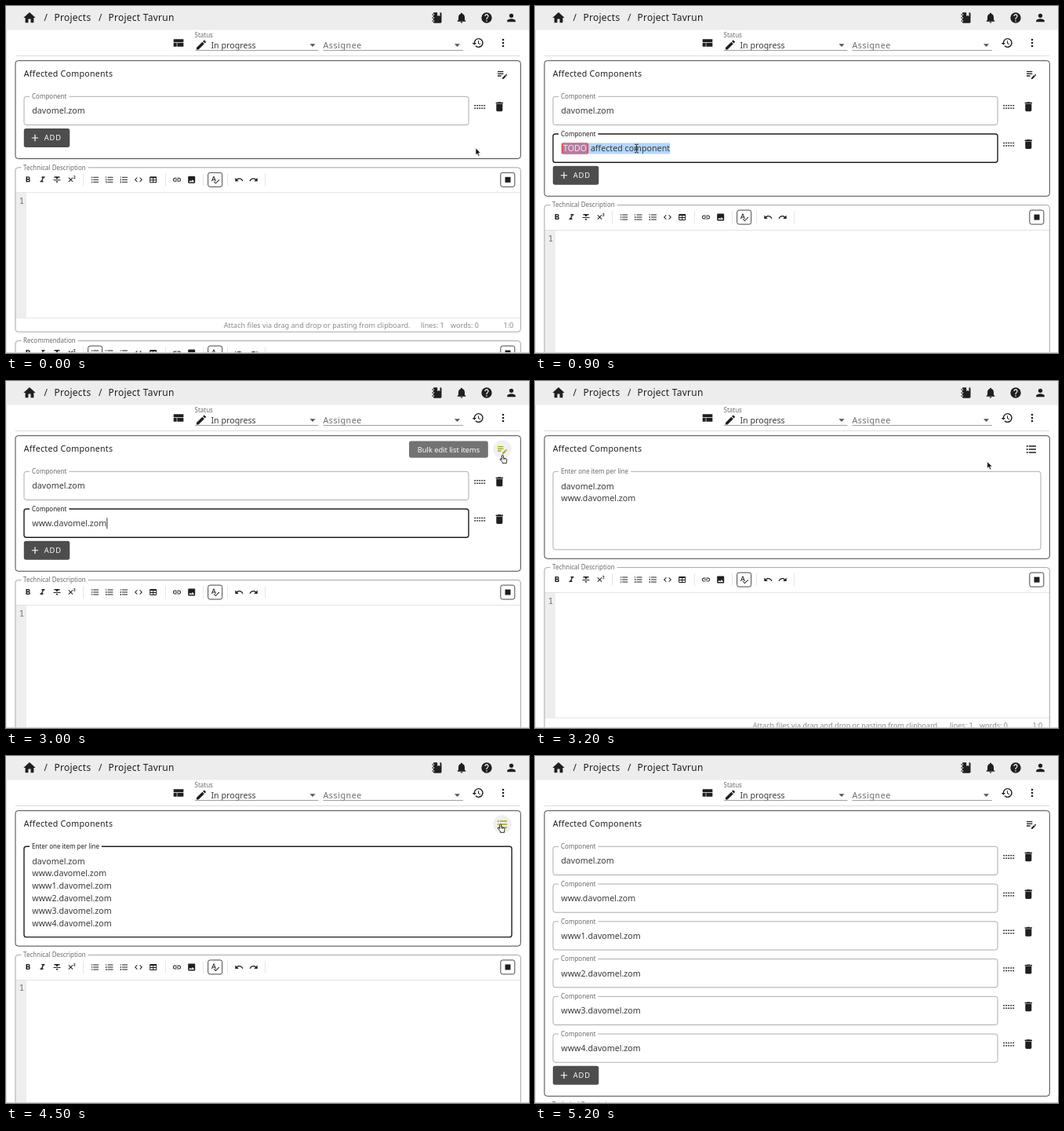
Recreate the animation shown at these times as an HTML page. Size 667 by 442 pixels, loop 5.4 s.

```html
<!DOCTYPE html>
<html lang="en">
<head>
<meta charset="utf-8">
<title>Bulk editing components</title>
<style>
html, body { margin: 0; width: 100%; height: 100%; overflow: hidden; background: #fff; }
svg { display: block; font-family: "Noto Sans", "Open Sans", sans-serif; }
</style>
</head>
<body>
<svg id="stage" width="667" height="442" viewBox="0 0 667 442"></svg>
<script>
const LOOP = 5400, STEP = 100, ROW = 47.75, LINE = 15.85, BODY = 10.667;
const DARK = '#1f1f1f', INK = '#3a3a3a', GREY = '#6b6b6b', LIME = '#a0a912';
const HOST = 'davomel.zom', WWW = 'www.' + HOST;
const MORE = [1, 2, 3, 4].map(n => `www${n}.${HOST}`);

// Icons on a 24 x 24 grid
const LINES = 'M7 19h14v-2H7zM7 13h14v-2H7zM7 5v2h14V5z';
const ICON = {
  home: 'M10 20v-6h4v6h5v-8h3L12 3 2 12h3v8z',
  book: 'M3 7V5h2V4a2 2 0 0 1 2-2h6v7l2.5-1.5L18 9V2h1c1 0 2 1 2 2v16c0 1-1 2-2 2H7c-1 0-2-1-2-2v-1H3v-2h2v-4H3v-2h2V7zM5 5v2h2V5zM5 19h2v-2H5zM5 13h2v-2H5z',
  bell: 'M12 22c1.1 0 2-.9 2-2h-4c0 1.1.9 2 2 2zm6-6v-5c0-3.07-1.64-5.64-4.5-6.32V4c0-.83-.67-1.5-1.5-1.5s-1.5.67-1.5 1.5v.68C7.63 5.36 6 7.92 6 11v5l-2 2v1h16v-1z',
  help: 'M12 2a10 10 0 1 0 0 20 10 10 0 0 0 0-20zm1 17h-2v-2h2zm2.07-7.75l-.9.92C13.45 12.9 13 13.5 13 15h-2v-.5c0-1.1.45-2.1 1.17-2.83l1.24-1.26A2 2 0 1 0 10 9H8a4 4 0 1 1 7.07 2.25z',
  person: 'M12 12a4 4 0 1 0 0-8 4 4 0 0 0 0 8zm0 2c-2.67 0-8 1.34-8 4v2h16v-2c0-2.66-5.33-4-8-4z',
  layout: 'M3 19h6v-7H3zM10 19h12v-7H10zM3 5v6h19V5z',
  pencil: 'M3 17.25V21h3.75L17.81 9.94l-3.75-3.75zM20.71 7.04a1 1 0 0 0 0-1.41l-2.34-2.34a1 1 0 0 0-1.41 0l-1.83 1.83 3.75 3.75z',
  history: 'M13 3a9 9 0 0 0-9 9H1l3.89 3.89.07.14L9 12H6a7 7 0 1 1 2.06 4.94l-1.42 1.42A9 9 0 1 0 13 3zm-1 5v5l4.28 2.54.72-1.21-3.5-2.08V8z',
  dots: 'M12 8a2 2 0 1 0 0-4 2 2 0 0 0 0 4zm0 2a2 2 0 1 0 0 4 2 2 0 0 0 0-4zm0 6a2 2 0 1 0 0 4 2 2 0 0 0 0-4z',
  trash: 'M6 19c0 1.1.9 2 2 2h8c1.1 0 2-.9 2-2V7H6zM19 4h-3.5l-1-1h-5l-1 1H5v2h14z',
  plus: 'M19 13h-6v6h-2v-6H5v-2h6V5h2v6h6z',
  note: 'M3 10h11v2H3zM3 8h11V6H3zM3 16h7v-2H3zm15.01-3.13l.71-.71a1 1 0 0 1 1.41 0l.71.71a1 1 0 0 1 0 1.41l-.71.71zm-.71.71l-5.3 5.3V21h2.12l5.3-5.3z',
  list: LINES + 'M4 4.5a1.5 1.5 0 1 0 0 3 1.5 1.5 0 0 0 0-3zm0 6a1.5 1.5 0 1 0 0 3 1.5 1.5 0 0 0 0-3zm0 6a1.5 1.5 0 1 0 0 3 1.5 1.5 0 0 0 0-3z',
  numbers: LINES + 'M2 17h2v.5H3v1h1v.5H2v1h3v-4H2zM3 8h1V4H2v1h1zM2 11h1.8L2 13.1v.9h3v-1H3.2L5 10.9V10H2z',
  bold: 'M15.6 10.79c.97-.67 1.65-1.77 1.65-2.79 0-2.26-1.75-4-4-4H7v14h7.04c2.09 0 3.71-1.7 3.71-3.79 0-1.52-.86-2.82-2.15-3.42zM10 6.5h3a1.5 1.5 0 0 1 0 3h-3zm3.5 9H10v-3h3.5a1.5 1.5 0 0 1 0 3z',
  italic: 'M10 4v3h2.21l-3.42 8H6v3h8v-3h-2.21l3.42-8H18V4z',
  strike: 'M3 14h18v-2H3zM5 4v3h5v3h4V7h5V4zM10 19h4v-3h-4z',
  power: 'M16 7.4L11.4 12l4.6 4.6-1.4 1.4-4.6-4.6L5.4 18 4 16.6 8.6 12 4 7.4 5.4 6l4.6 4.6L14.6 6zM21.9 9H17V8c1.2-1.1 3.1-2.5 3.1-3.7 0-1.2-1.3-1.2-2.4-.4l-.5-1.2C19 1.400 21.700 2 21.700 4.200c0 1.300-1.200 2.500-2.400 3.400h2.600z',
  code: 'M9.4 16.6L4.8 12l4.6-4.6L8 6l-6 6 6 6zM14.6 16.6l4.6-4.6-4.6-4.6L16 6l6 6-6 6z',
  table: 'M5 4h14a2 2 0 0 1 2 2v12a2 2 0 0 1-2 2H5a2 2 0 0 1-2-2V6a2 2 0 0 1 2-2zm0 4v4h6V8zm8 0v4h6V8zm-8 6v4h6v-4zm8 0v4h6v-4z',
  link: 'M3.9 12A3.1 3.1 0 0 1 7 8.9h4V7H7a5 5 0 0 0 0 10h4v-1.9H7A3.1 3.1 0 0 1 3.9 12zM8 13h8v-2H8zm9-6h-4v1.900h4a3.1 3.1 0 0 1 0 6.200h-4V17h4a5 5 0 0 0 0-10z',
  image: 'M21 19V5a2 2 0 0 0-2-2H5a2 2 0 0 0-2 2v14a2 2 0 0 0 2 2h14a2 2 0 0 0 2-2zM8.500 13.500l2.500 3 3.500-4.500 4.500 6H5z',
  spell: 'M12.45 16h2.09L9.43 3H7.57L2.46 16h2.09l1.12-3h5.64zM6.430 11L8.500 5.480 10.570 11zM21.590 11.590l-8.090 8.090L9.830 16l-1.410 1.410 5.090 5.090L23 13z',
  undo: 'M12.500 8c-2.650 0-5.050 1-6.900 2.600L2 7v9h9l-3.620-3.620c1.390-1.160 3.160-1.880 5.120-1.880 3.540 0 6.550 2.310 7.600 5.500l2.370-.78C21.080 11.030 17.150 8 12.500 8z'
};

const pen = document.createElement('canvas').getContext('2d');
function width(s) {
  pen.font = `${BODY}px "Noto Sans", "Open Sans", sans-serif`;
  return pen.measureText(s).width;
}
const text = (x, y, s, size = BODY, fill = INK, more = '') =>
  `<text x="${x}" y="${y}" font-size="${size}" fill="${fill}" ${more}>${s}</text>`;
const rect = (x, y, w, h, fill, more = '') =>
  `<rect x="${x}" y="${y}" width="${w}" height="${h}" fill="${fill}" ${more}/>`;
const frame = (x, y, w, h, color, line = 1, r = 3) =>
  rect(x, y, w, h, 'none', `rx="${r}" stroke="${color}" stroke-width="${line}"`);
const path = (d, fill, more = '') => `<path d="${d}" fill="${fill}" ${more}/>`;
const icon = (name, x, y, k = 2 / 3, fill = DARK, flip = 1) =>
  path(ICON[name], fill, `fill-rule="evenodd" transform="translate(${x} ${y}) scale(${k * flip} ${k}) translate(-12 -12)"`);
const caret = (x, y) => rect(x, y - 7, 0.9, 14, '#222');

function header() {
  const bold = 'font-weight="500" letter-spacing=".25"';
  const select = (x, w) => rect(x, 56, w, 0.8, '#888') +
    path(`M${x + w - 11} 48.300h7l-3.500 3.600z`, '#555');
  return rect(0, 0, 667, 30.5, '#ededed') + rect(0, 30, 0.8, 412, '#d5d5d5') +
    icon('home', 30, 15, 0.77) +
    text(48.5, 19.3, '/', 12, DARK, bold) + text(61.5, 19.3, 'Projects', 12, DARK, bold) +
    text(118, 19.3, '/', 12, DARK, bold) + text(130.5, 19.3, 'Project Tavrun', 12, DARK, bold) +
    icon('book', 549.5, 15) + icon('bell', 581, 15) + icon('help', 613, 15) + icon('person', 644.5, 15) +
    icon('layout', 219.700, 47) + text(240.5, 40, 'Status', 8, GREY) +
    icon('pencil', 249, 49.5) + text(261.5, 53.5, 'In progress') + select(241, 157.5) +
    text(404.5, 53.5, 'Assignee', BODY, GREY, 'letter-spacing=".55"') + select(404.5, 178.5) +
    icon('history', 602, 47) + icon('dots', 634, 47) + rect(12, 63, 644, 0.8, '#d4d4d4');
}

function outline(y, w, h, label, focus, hover) {
  return frame(23, y, w, h, focus || hover ? DARK : '#999', focus ? 1.4 : 0.8) +
    rect(30, y - 3, width(label) * 0.75 + 6, 6, '#fff') +
    text(33, y + 2.8, label, 8, focus ? DARK : GREY);
}

function row(i, value, s) {
  const y = 115.3 + ROW * i, mid = y + 18.200, live = i === 1;
  const todo = live && s.todo, end = 36 + width('TODO');
  let body = text(33.3, mid + 3.8, value);
  if (todo) {
    const rest = ' affected component', on = s.selected;
    body = (on ? rect(33.3, mid - 6.800, end + 2 + width(rest) - 33.3, 14, '#b5d6fd') : '') +
      rect(34, mid - 6.800, end - 32, 14, '#e5433d', 'rx="2"') +
      (on ? rect(35.300, mid - 6.800, end - 34.600, 14, '#b57c9f') : '') +
      text(36, mid + 3.8, 'TODO', BODY, on ? '#f2e6f2' : '#fff') +
      text(end + 2, mid + 3.8, rest, BODY, INK, 'xml:space="preserve"');
  }
  if (live && s.caret) body += caret(33.5 + width(value), mid);
  const grip = [126.700, 130.200].map(g =>
    `<path d="M597.200 ${g + ROW * i}h14" stroke="#333" stroke-width="1.600" stroke-dasharray="1.900 1.120"/>`).join('');
  return outline(y, 567, 36.2, 'Component', live && s.focus, live && s.hover) + body + grip +
    icon('trash', 629.300, 128.200 + ROW * i);
}

function card(s) {
  const icons = s.bulk ? 'list' : 'note';
  let out = frame(12, 69.7, 644.3, s.bottom - 69.7, '#444', 1, 3.5) +
    text(22.800, 90, 'Affected Components', BODY, DARK, 'font-weight="500" letter-spacing=".25"') +
    (s.over ? '<circle cx="633" cy="87" r="11.700" fill="#f0f0f0"/>' : '') +
    icon(icons, 633, 87, 2 / 3, s.over ? LIME : DARK);
  if (s.bulk) {
    out += outline(115.3, 622, s.bottom - 126.800, 'Enter one item per line', s.focus);
    s.items.forEach((v, i) => out += text(33.3, 137.5 + LINE * i, v));
    if (s.caret) {
      const n = s.items.length - 1;
      out += caret(33.5 + width(s.items[n]), 133.5 + LINE * n);
    }
  } else {
    const y = 156 + ROW * (s.items.length - 1);
    s.items.forEach((v, i) => out += row(i, v, s));
    out += rect(22.800, y, 58.5, 24, s.press ? '#626262' : '#4d4d4d', 'rx="2.700"') +
      icon('plus', 37, y + 12, 0.6, '#fff') +
      text(48.800, y + 15.4, 'ADD', 9.333, '#fff', 'font-weight="500" letter-spacing=".8"');
  }
  if (s.tip) {
    out += rect(514, 76.5, 100.800, 21.200, '#737373', 'rx="2.700"') +
      text(524.800, 90.5, 'Bulk edit list items', 9.24, '#fff');
  }
  return out;
}

function editor(y, label, boxed) {
  const mid = y + 15.5, foot = y + 204.3;
  const tools = { bold: 28, italic: 46.5, strike: 65, power: 83.5, list: 113.700, numbers: 132, code: 169,
    table: 187.700, link: 218, image: 236.700, spell: 266.700, undo: 297.3 };
  let out = rect(12.400, y + 32, 13.600, 159, '#eee') +
    rect(12, y + 31.5, 644, 0.8, '#ddd') + rect(12, y + 191, 644, 0.8, '#ddd') +
    frame(12, y, 644.3, 209.3, '#a5a5a5', 1, 3.5) +
    rect(19.5, y - 3, width(label) * 0.75 + 5.5, 6, '#fff') + text(22, y + 2.8, label, 8, GREY);
  for (const name in tools) out += icon(name, tools[name], mid, 0.5);
  out += icon('numbers', 150.5, mid, 0.5) + icon('undo', 315.700, mid, 0.5, DARK, -1);
  for (const x of [98, 203, 251, 282, 330]) out += rect(x, mid - 8, 0.7, 16, '#ddd');
  for (const x of boxed) out += frame(x - 9, mid - 9, 18, 18, '#333', 0.9, 2.5);
  return out + rect(636.5, mid - 3.5, 7, 7, DARK) +
    text(16.700, y + 46, '1', BODY, GREY, 'style="font-family:\'Noto Sans Mono\',monospace"') +
    text(277.800, foot, 'Attach files via drag and drop or pasting from clipboard.', 9.05, '#8a8a8a') +
    text(529, foot, 'lines: 1', 9.05, '#8a8a8a') + text(567, foot, 'words: 0', 9.05, '#8a8a8a') +
    text(634.5, foot, '1:0', 9.05, '#8a8a8a');
}

// Pointer moves: start, end, from x y, to x y
const MOVES = [
  [0, 500, 599, 181, 47, 166], [600, 800, 47, 168, 129.5, 181.5],
  [2500, 3000, 129.5, 181.5, 633.5, 94], [3100, 3500, 633.5, 94, 270.5, 149.5],
  [4100, 4500, 270.5, 149.5, 630.800, 86.5]
];

function pointer(t) {
  if (t >= 5100 || (t >= 1500 && t < 2600) || (t >= 3800 && t < 4200)) return '';
  const [a, b, x0, y0, x1, y1] = MOVES.filter(m => m[0] <= t).pop();
  const p = Math.min(1, (t - a) / (b - a)), e = p * p * (3 - 2 * p);
  const x = x0 + (x1 - x0) * e, y = y0 + (y1 - y0) * e;
  const at = `transform="translate(${x} ${y})" stroke-linejoin="round"`;
  if ((x > 622 && y < 99) || t === 500) {
    return path('M-1.200 .9Q-.2-.5.8.9V4.200l3.400.7q1.300.4 1.100 1.900L4.700 9.300V10.800H-.3V9.500L-3.300 6.200q-.6-1.200.7-1.200l1.400 1.100z',
      '#fff', at + ' stroke="#111" stroke-width=".9"') +
      path('M1 4.500v2M2.700 5v1.800', 'none', at + ' stroke="#111" stroke-width=".6"');
  }
  const inField = x < 590 && y > 116 && (t < 3100 ? t >= 600 && y > 163 : true);
  if (inField) {
    return path('M-2.500-5.500Q0-5.500 0-4V4Q0 5.500-2.500 5.500M2.500-5.500Q0-5.500 0-4M0 4Q0 5.500 2.500 5.500M-1.300 1h2.600',
      'none', at + ' stroke="#222" stroke-width="1"');
  }
  return path('M0 0V8.700L2 6.900 3.400 10.200 5 9.500 3.600 6.300H6.300z', '#111', at + ' stroke="#fff" stroke-width=".6"');
}

function state(t) {
  const s = { items: [HOST], bulk: t >= 3100 && t < 4600 };
  s.press = t === 500;
  s.over = (t >= 2900 && t < 3200) || (t >= 4500 && t < 4700);
  s.tip = t === 3000;
  if (t >= 4600) s.items = [HOST, WWW, ...MORE];
  else if (s.bulk) {
    s.items = [HOST, WWW];
    if (t >= 4000) s.items.push(...MORE);
    else if (t >= 3700) s.items.push('');
    s.focus = t >= 3500;
    s.caret = t >= 3500 && t < 4000;
  } else if (t >= 600) {
    const n = t < 2100 ? Math.min(11, (t - 1500) / 50 + 3) : Math.min(15, (t - 2100) / 100 + 12);
    s.todo = t < 1500;
    s.hover = t >= 700;
    s.focus = t >= 800;
    s.selected = t >= 900;
    s.caret = !s.todo;
    s.items.push(s.todo ? '' : WWW.slice(0, n));
  }
  s.bottom = s.bulk ? 226.300 + LINE * Math.max(0, s.items.length - 5)
    : 194.5 + ROW * (s.items.length - 1);
  return s;
}

function scene(t) {
  const s = state(t), y = s.bottom + 11.3;
  return header() + card(s) + editor(y, 'Technical Description', [266.700, 639.800]) +
    editor(y + 220.700, 'Recommendation', [113.700, 266.700, 639.800]) +
    rect(0, 441, 667, 1, '#d0d0d0') + pointer(t);
}

const stage = document.getElementById('stage'), start = performance.now();
let shown = -1;
function tick() {
  const t = Math.floor((performance.now() - start) % LOOP / STEP) * STEP;
  if (t !== shown) stage.innerHTML = scene(shown = t);
  requestAnimationFrame(tick);
}
tick();
</script>
</body>
</html>
```
